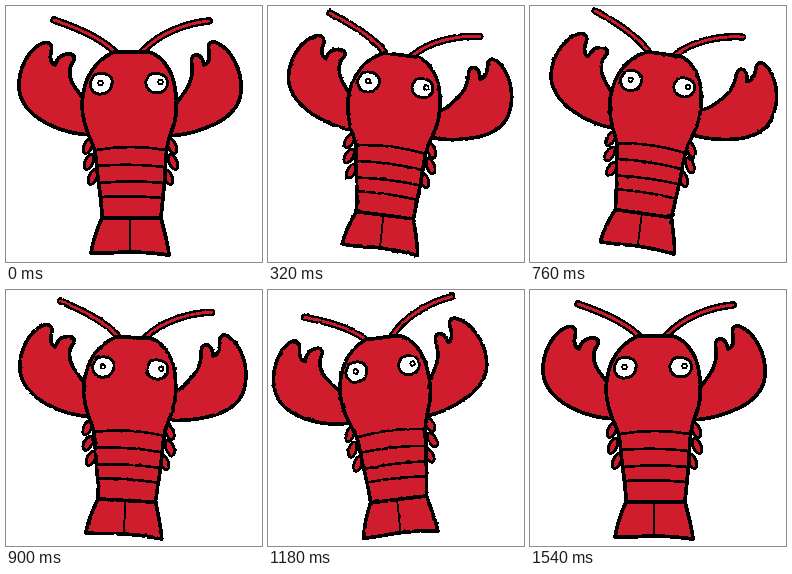
Animation of 256 by 256 pixels, one loop 1.74 s. Source, as an HTML page:

```html
<!DOCTYPE html>
<html lang="en">
<head>
<meta charset="utf-8">
<title>Dancing lobster</title>
<style>
  html, body { margin: 0; width: 100%; height: 100%; overflow: hidden; background: #fff; }
  svg { display: block; width: 100vw; height: 100vh; }
  .part { fill: #cf1d2d; stroke: #000; stroke-width: 3.8; stroke-linejoin: round; stroke-linecap: round; }
  .line { fill: none; stroke: #000; stroke-width: 2.7; stroke-linecap: round; }
  .feeler { fill: none; stroke: #000; stroke-width: 7.6; stroke-linecap: round; }
  .feeler.core { stroke: #cf1d2d; stroke-width: 2.8; }
  .eye { fill: #fff; stroke: #000; stroke-width: 3; }
</style>
</head>
<body>
<svg viewBox="0 0 256 256" shape-rendering="crispEdges">
  <defs>
    <filter id="rough" filterUnits="userSpaceOnUse" x="0" y="0" width="256" height="256" color-interpolation-filters="sRGB">
      <feTurbulence id="noise" type="fractalNoise" baseFrequency="0.16" numOctaves="1" result="n"/>
      <feDisplacementMap in="SourceGraphic" in2="n" scale="2.5" xChannelSelector="R" yChannelSelector="G"/>
    </filter>
    <path id="feelerL" d="M48 14C68 21 92 30 108 45"/>
    <path id="feelerR" d="M203 15C180 17 152 28 137 45"/>
  </defs>
  <g id="stage">
    <g id="lobster">
      <g id="feelers">
        <use href="#feelerL" class="feeler"/><use href="#feelerL" class="feeler core"/>
        <use href="#feelerR" class="feeler"/><use href="#feelerR" class="feeler core"/>
      </g>
      <path id="clawL" class="part" d="M88 129C72 129 55 125 40 117C24 108 14 97 13 82C12 64 22 43 37 37C43 35 47 39 45 46C43 54 46 58 49 59C51 52 56 48 63 48C68 48 70 52 67 56C62 62 63 72 68 80C74 88 78 96 88 102Z"/>
      <path id="clawR" class="part" d="M160 130C178 130 194 125 209 118C225 110 235 98 235 83C236 64 225 43 211 37C205 34 201 38 203 45C204 53 202 58 198 59C197 53 194 48 189 49C185 50 185 55 186 60C187 70 184 78 180 84C174 92 172 99 160 104Z"/>
      <g id="legs" class="part" style="stroke-width:3"></g>
      <path class="part" d="M96 212L155 212C158 225 162 237 163 249C150 247 137 246 124 246C110 246 97 248 85 247C87 234 91 223 96 212Z"/>
      <path class="line" style="stroke-width:2" d="M124 213V246"/>
      <path class="part" d="M108 46H143C157 50 167 66 169 82C172 99 171 113 165 127C160 139 160 151 159 168C158 185 156 198 155 212H96C96 199 94 187 92 172C90 158 91 149 87 139C80 125 76 113 76 98C77 79 84 57 108 46Z"/>
      <path class="line" d="M90 144Q125 138 160 144M91 160Q126 157 159 161M93 177Q125 174 158 177M95 191Q125 189 156 192"/>
      <path class="eye" d="M88 69C95 66 104 67 106 74C107 82 102 88 95 88C88 89 84 83 84 77Z"/>
      <path class="eye" d="M143 69C149 66 159 67 161 74C163 82 157 87 151 87C144 87 139 82 140 75Z"/>
      <circle class="eye" cx="94.5" cy="77" r="2.2" style="stroke-width:2"/>
      <circle class="eye" cx="154.5" cy="76" r="2.2" style="stroke-width:2"/>
    </g>
  </g>
</svg>
<script>
const $ = id => document.getElementById(id);

// One leg on each side per row: left x, right x, y.
$('legs').innerHTML = [[82, 166, 140], [83, 167, 156], [87, 162, 171]].map(([l, r, y]) =>
  [[l, 25], [r, -25]].map(([x, tilt]) =>
    `<ellipse cx="${x}" cy="${y}" rx="4" ry="8" transform="rotate(${tilt} ${x} ${y})"/>`).join('')).join('');

// Each pose: 2x2 matrix (a b c d), body centre x y, extra swing of left and right claw.
const poses = {
  rest:  [1, 0, 0, 1, 125, 131, 0, 0],
  right: [.97, .12, -.098, .965, 124.3, 131, 0, 7],
  far:   [.945, .175, -.165, .95, 122.5, 129, 0, 14],
  back:  [.975, .055, -.045, .982, 124, 131, -2, 6],
  left:  [.96, -.036, .0235, .98, 124.2, 131.5, -3, 0],
  end:   [.95, -.115, .1, .974, 122, 130.5, -3, -3]
};

// start time, from, to, blend
const steps = [
  [0, 'rest', 'rest', 0],
  [200, 'rest', 'right', 1 / 2],
  [320, 'right', 'right', 0],
  [440, 'right', 'far', 1 / 2],
  [560, 'far', 'far', 0],
  [760, 'far', 'back', 1 / 3],
  [830, 'far', 'back', 2 / 3],
  [900, 'back', 'back', 0],
  [970, 'back', 'left', 1 / 2],
  [1040, 'left', 'left', 0],
  [1110, 'left', 'end', 1 / 2],
  [1180, 'end', 'end', 0],
  [1300, 'end', 'rest', 1 / 3],
  [1420, 'end', 'rest', 2 / 3],
  [1540, 'rest', 'rest', 0]
];
const LOOP = 1740;
let shown = -1;

function show(i) {
  const [, from, to, k] = steps[i];
  const [a, b, c, d, x, y, swingL, swingR] =
    poses[from].map((v, n) => v + (poses[to][n] - v) * k);
  const e = x - a * 125 - c * 131, f = y - b * 125 - d * 131;
  $('lobster').setAttribute('transform', `matrix(${a} ${b} ${c} ${d} ${e} ${f})`);
  $('feelers').setAttribute('transform', `rotate(${b * 12} 123 45)`);
  $('clawL').setAttribute('transform', `translate(${swingL} 0) rotate(${swingL} 78 115)`);
  $('clawR').setAttribute('transform', `translate(${swingR * .5} ${-swingR * .3}) rotate(${swingR} 172 115)`);
  $('noise').setAttribute('seed', i);
  if (from === 'rest' && to === 'rest') $('stage').removeAttribute('filter');
  else $('stage').setAttribute('filter', 'url(#rough)');
}

const t0 = performance.now();
function tick(now) {
  const t = Math.max(0, now - t0) % LOOP;
  const i = steps.findLastIndex(s => s[0] <= t);
  if (i !== shown) show(shown = i);
  requestAnimationFrame(tick);
}
tick(t0);
</script>
</body>
</html>
```
